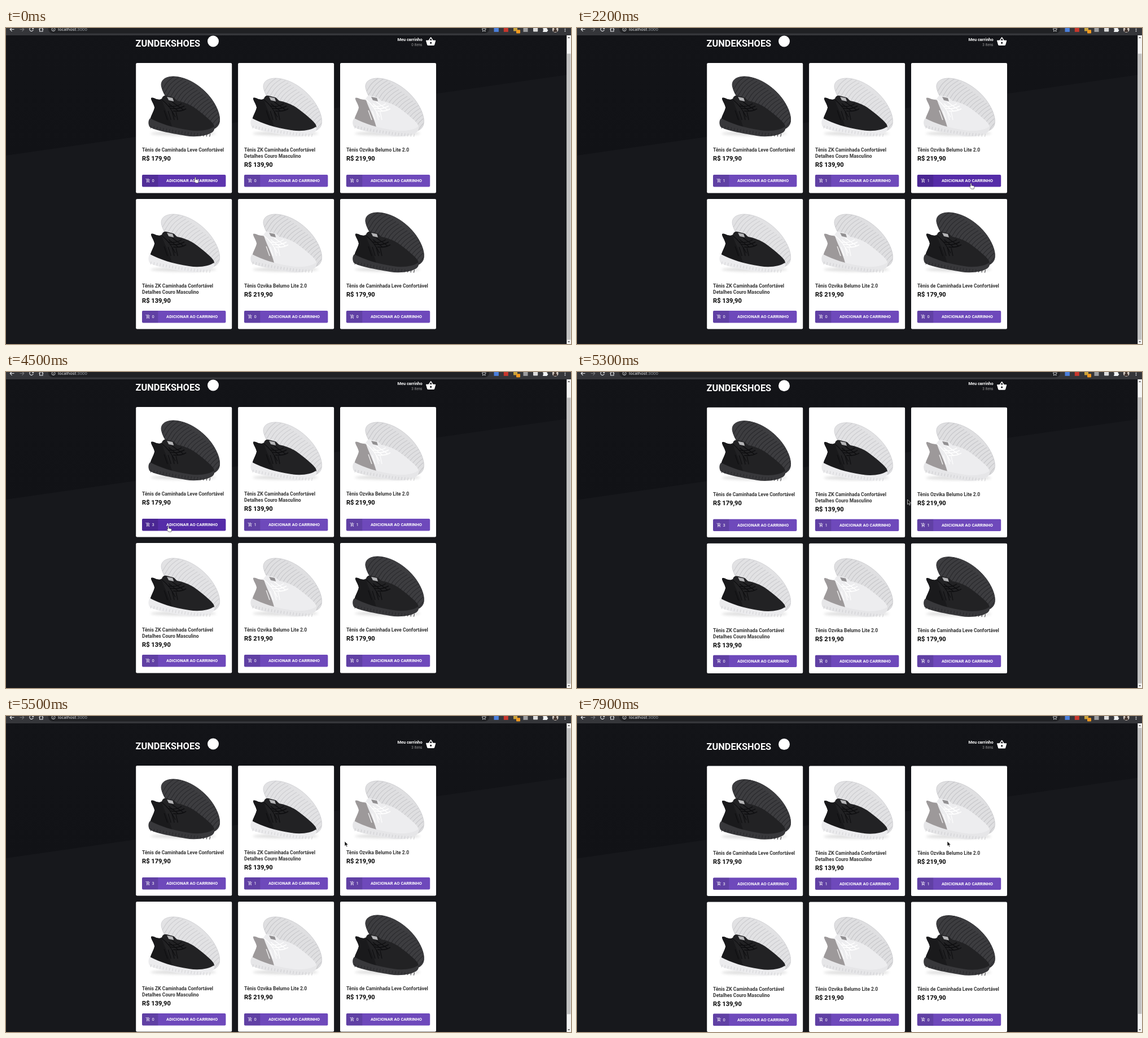
Write an HTML page that moves like this. It is 1001 px wide and 560 px high and loops after 8 s.

```html
<!DOCTYPE html>
<html lang="pt-BR">
<head>
<meta charset="utf-8">
<title>Loja</title>
<style>
  html, body { margin: 0; width: 100%; height: 100%; overflow: hidden; background: #17181c; }
  svg { display: block; }
  #stage { width: 100vw; height: 100vh; }
  text { font-family: Roboto, "Liberation Sans", sans-serif; fill: #fff; }
  .b { font-weight: 700; }
  .name { font-size: 8.52px; fill: #333; }
  .price { font-size: 11.1px; fill: #000; }
  .label { font-size: 7.5px; text-anchor: middle; }
  .qty { font-size: 7.5px; }
  .logo { font-size: 16.35px; }
  .cart { font-size: 7.4px; text-anchor: end; }
  .items { font-size: 6.4px; fill: #999; text-anchor: end; }
  .url { font: 7.65px "Noto Sans", "Open Sans", sans-serif; fill: #e8eaed; }
</style>
</head>
<body>
<svg id="stage" viewBox="0 0 1001 560" preserveAspectRatio="none">
  <defs>
    <linearGradient id="top" x1="0" y1="0" x2="0" y2="1">
      <stop offset="0" stop-color="#131418"/><stop offset="1" stop-color="#111216"/>
    </linearGradient>
    <filter id="soft" x="-20%" y="-100%" width="140%" height="300%"><feGaussianBlur stdDeviation="2"/></filter>
    <path id="sole" d="M45 40C44 29 54 24 67 24C92 25 118 42 134 64C146 81 151 98 147 108C143 117 134 119 126 117L64 74C55 64 47 52 45 40Z"/>
    <path id="upper" d="M27 64C26 61 29 61 32 62C37 65 42 66 46 63C47 59 50 57 54 58L66 61C69 62 70 65 73 67C84 69 94 73 102 78C116 88 131 100 137 108C140 113 139 117 136 120C118 128 82 124 56 117C42 113 29 107 25 101C27 92 32 85 33 79C32 73 28 68 27 64Z"/>
    <path id="mid" d="M25 98C22 101 21 107 24 113C34 120 60 124 88 129C106 132 126 129 135 123C139 120 140 116 138 113C130 119 112 122 94 119C66 115 42 107 25 98Z"/>
    <clipPath id="soleClip"><use href="#sole"/></clipPath>
    <clipPath id="upperClip"><use href="#upper"/></clipPath>
    <path id="add" d="M11 9h2V6h3V4h-3V1h-2v3H8v2h3v3zm-4 9c-1.1 0-2 .9-2 2s.9 2 2 2 2-.9 2-2-.9-2-2-2zm10 0c-1.1 0-2 .9-2 2s.9 2 2 2 2-.9 2-2-.9-2-2-2zm-9.8-3.3l.9-1.7h7.45c.75 0 1.4-.4 1.75-1L21.2 5 19.4 4l-3.85 7H8.5L4.3 2H1v2h2l3.6 7.6-1.35 2.4C4.5 15.4 5.5 17 7 17h12v-2H7.4z"/>
    <path id="basket" fill-rule="evenodd" d="M17.2 9l-4.4-6.6c-.4-.5-1.2-.5-1.6 0L6.8 9H2c-.6 0-1.1.6-1 1.3l2.6 9.2c.2.9 1 1.5 1.9 1.5h13c.9 0 1.7-.6 1.9-1.5L23 10c0-.6-.4-1-1-1h-4.8zM9 9l3-4.4L15 9H9zm3 8a2 2 0 1 1 0-4 2 2 0 0 1 0 4z"/>
  </defs>

  <rect width="1001" height="560" fill="#17181c"/>
  <g id="page">
    <path d="M0-40H1001V82L0 226Z" fill="url(#top)"/>
    <text class="b logo" x="229.6" y="33">ZUNDEKSHOES</text>
    <circle cx="367" cy="23.5" r="10" fill="#fff"/>
    <g id="cart">
      <text class="b cart" x="737.6" y="22.6">Meu carrinho</text>
      <text id="items" class="items" x="737.4" y="31.6"></text>
      <use href="#basket" transform="translate(743.3 14.6) scale(.782)" fill="#fff"/>
    </g>
    <g id="list"></g>
  </g>

  <g id="scrollbar">
    <rect x="993.3" y="13" width="8" height="547" fill="#f4f4f4"/>
    <rect id="thumb" x="994" width="6.4" height="507" fill="#c1c1c1"/>
    <path d="M995.2 18l2-2.6 2 2.6z" fill="#555"/>
    <path d="M995.2 555l2 2.6 2-2.6z" fill="#555"/>
  </g>

  <g id="toolbar" fill="none" stroke="#e8eaed" stroke-width="1.1">
    <rect width="1001" height="13" fill="#35363a" stroke="none"/>
    <rect x="75" y="-8" width="781" height="17.6" rx="8" fill="#202124" stroke="none"/>
    <path d="M14.5 2.5H7.5M10.5-.8L7.2 2.5l3.3 3.3"/>
    <path d="M24.5 2.5h7M28.5-.8l3.3 3.3-3.3 3.3" stroke="#77797d"/>
    <path d="M47.8.5A3.3 3.3 0 1 0 48.3 3M48.6-1.5V1.2H46"/>
    <path d="M58.5 2.5L62.3-1l3.8 3.5M59.6 2v4h5.4v-4"/>
    <circle cx="84" cy="2.5" r="3.1" stroke-width=".8"/>
    <path d="M84 2v2.4M84 .6v.8" stroke-width=".8"/>
    <text class="url" x="92" y="5.2" stroke="none">localhost<tspan fill="#9aa0a6">:3000</tspan></text>
    <path d="M846.8-1.2l1.1 2.5 2.7.3-2 1.8.6 2.7-2.4-1.4-2.4 1.4.6-2.7-2-1.8 2.7-.3z" stroke-width=".8"/>
    <g stroke="none">
      <rect x="864.5" y="-1.5" width="8.4" height="8.4" fill="#4a7fdc"/>
      <rect x="881.8" y="-1.5" width="8" height="8.4" fill="#c9372c"/>
      <rect x="899" y="-1.5" width="7" height="7" fill="#c9a23c"/>
      <rect x="904" y="3.2" width="7" height="6.4" rx="1" fill="#f29a1f"/>
      <rect x="916.5" y="-1.5" width="8" height="8.4" fill="#9b9c9e"/>
      <rect x="934" y="-1.5" width="8.2" height="8" rx="1" fill="#dcdcdc"/>
      <path d="M951.3.2h2.3a1.5 1.5 0 0 1 3 0h2.2v2.3a1.5 1.5 0 0 1 0 3V7h-7.5V4.8a1.4 1.4 0 0 0 0-2.6z" fill="#f1f3f4"/>
      <circle cx="973.2" cy="2.5" r="5.4" fill="#cfc6be"/>
      <path d="M970 7c0-4 1-4 2-4.4C970 1 971-3 973.2-3s3.2 4 1.2 5.6c1 .4 2 .4 2 4.4z" fill="#41342f"/>
      <g fill="#e8eaed"><circle cx="990.5" cy="-.5" r=".9"/><circle cx="990.5" cy="2.5" r=".9"/><circle cx="990.5" cy="5.5" r=".9"/></g>
    </g>
  </g>

  <g id="pointer">
    <path id="hand" d="M-.9.9C-.9-.3 1-.3 1 .9V4l3.6.7C5.6 5 6 5.6 5.9 6.5L5.2 10.2H.6L-2.4 6.6C-3 5.7-2 5-1.2 5.6L-.9 5.9Z" fill="#fff" stroke="#222" stroke-width=".6"/>
    <path id="arrow" d="M0 0V8.6L2 6.8 3.4 10 4.9 9.3 3.5 6.3H6.2Z" fill="#111" stroke="#fff" stroke-width=".6"/>
  </g>
</svg>

<script>
const $ = id => document.getElementById(id);
const clamp = v => Math.max(0, Math.min(1, v));
const LOOP = 8000, STEP = 100;

const looks = {
  black: { sole: '#3d3d40', ridge: '#2c2c2f', edge: '#303033', upper: '#222224', mid: '#38383b', tread: '#27272a',
           heel: '#1a1a1c', lace: '#0e0e10', tag: '#b5b5b7', drop: 0 },
  mixed: { sole: '#e2e2e4', ridge: '#cfcfd2', edge: '#d3d3d6', upper: '#222224', mid: '#ececee', tread: '#d2d2d5',
           heel: '#19191b', lace: '#0e0e10', tag: '#b5b5b7', drop: 3 },
  white: { sole: '#dfdfe1', ridge: '#cacacd', edge: '#cfcfd2', upper: '#ededef', mid: '#e6e6e8', tread: '#cdcdd0',
           heel: '#9d999a', lace: '#fff', tag: '#929092', drop: 3 }
};
const walk = { name: ['Tênis de Caminhada Leve Confortável'], price: '179,90', look: 'black' };
const leather = { name: ['Tênis ZK Caminhada Confortável', 'Detalhes Couro Masculino'], price: '139,90', look: 'mixed' };
const lite = { name: ['Tênis Ozvika Belumo Lite 2.0'], price: '219,90', look: 'white' };
const products = [walk, leather, lite, leather, lite, walk];

function shoe(c) {
  let ridges = '', tread = '';
  for (let i = 0; i < 24; i++) ridges += `M${28 + i * 5} ${62 + i * 4}q16-8 22-20t24-22`;
  for (let i = 0; i < 20; i++) tread += `M${27 + i * 5.5} ${111 + 15 * Math.sin(i / 14)}l-1 5`;
  return `
    <ellipse cx="84" cy="125" rx="58" ry="4" fill="#bbb" opacity=".45" filter="url(#soft)"/>
    <g transform="translate(0 ${c.drop})">
      <use href="#sole" fill="${c.sole}" stroke="${c.edge}" stroke-width="1"/>
      <path d="${ridges}" clip-path="url(#soleClip)" fill="none" stroke="${c.ridge}" stroke-width="1.4"/>
    </g>
    <use href="#upper" fill="${c.upper}"/>
    <g clip-path="url(#upperClip)">
      <path d="M24 60L46 66C52 84 62 100 66 122L20 110Z" fill="${c.heel}"/>
      <path d="M46 65C55 72 62 80 70 96" fill="none" stroke="${c.lace}" stroke-width="1.2"/>
    </g>
    <path d="M50 84l6 17M57 85l5 16M64 86l4 15M71 87l3 14" stroke="${c.lace}" stroke-width="1.5" opacity=".8"/>
    <path d="M57 76q14 3 24-4M61 80q14 3 25-4M66 85q13 2 23-4M58 72l18 14M64 69l20 14" fill="none" stroke="${c.lace}" stroke-width="1.5"/>
    <path d="M55 60l10 2 2 6-9-2z" fill="${c.tag}"/>
    <use href="#mid" fill="${c.mid}"/>
    <path d="${tread}" stroke="${c.tread}" stroke-width="1"/>`;
}

function card(p, i) {
  const x = 230.2 + (i % 3) * 180.9, y = 62 + Math.floor(i / 3) * 241;
  const names = p.name.map((n, k) => `<text class="b name" x="10.9" y="${157.2 + k * 10.9}">${n}</text>`).join('');
  return `<g transform="translate(${x} ${y})">
    <rect width="170" height="230.4" rx="2" fill="#fff"/>
    ${shoe(looks[p.look])}${names}
    <text class="b price" x="10.9" y="${162.2 + p.name.length * 10.9}">R$ ${p.price}</text>
    <rect class="btn" x="10.8" y="198" width="148.4" height="21.4" rx="2"/>
    <path d="M39.2 198H12.8a2 2 0 0 0-2 2v17.4a2 2 0 0 0 2 2H39.2z" opacity=".12"/>
    <use href="#add" transform="translate(17.2 204.3) scale(.348)" fill="#fff"/>
    <text class="qty" x="28.4" y="211.3"></text>
    <text class="b label" x="99.4" y="211.1">ADICIONAR AO CARRINHO</text>
  </g>`;
}
$('list').innerHTML = products.map(card).join('');
const buttons = document.querySelectorAll('.btn'), counts = document.querySelectorAll('.qty');

// [time, x, y] of the pointer tip
const path = [
  [0, 335.5, 264.5], [600, 337, 266], [1100, 337, 266], [1200, 396, 271], [1300, 518, 270],
  [1700, 518, 270], [1800, 560, 273], [1900, 655, 275], [2000, 698, 275], [2600, 698, 275],
  [2700, 590, 277], [2800, 410, 277], [2900, 344, 277], [3100, 340, 276], [3200, 337, 272],
  [3500, 337, 272], [3700, 316, 272], [3900, 314, 273], [4300, 275, 276], [4700, 300, 270],
  [4800, 325, 260], [5000, 440, 242], [5200, 560, 230], [5300, 585.5, 226], [5500, 600, 222],
  [5700, 604, 219], [6000, 650, 168], [6300, 716, 78], [6500, 723, 65.5], [6800, 731, 64],
  [7200, 733, 64], [7400, 655, 145], [7600, 530, 258], [7750, 575, 262], [7900, 656, 222]
];
const scroll = [[5200, 0], [5300, .7], [5400, 14], [5500, 26], [5600, 26], [5700, 26.6]];
// [button, from, to]
const hovers = [[0, -140, 1300], [1, 1200, 1900], [2, 1800, 2800], [0, 2700, 4900]];
// [time, button]
const clicks = [[800, 0], [1500, 1], [2200, 2], [3300, 0], [4000, 0]];

function at(keys, t) {
  const n = keys.findIndex(k => k[0] > t);
  if (n === 0) return keys[0].slice(1);
  if (n < 0) return keys[keys.length - 1].slice(1);
  const a = keys[n - 1], b = keys[n], f = (t - a[0]) / (b[0] - a[0]);
  return a.slice(1).map((v, i) => v + (b[i + 1] - v) * f);
}
const mix = (a, b, f) => `rgb(${a.map((v, i) => Math.round(v + (b[i] - v) * f))})`;

function render(t) {
  const [dy] = at(scroll, t), [x, y] = at(path, t);
  $('page').setAttribute('transform', `translate(0 ${dy})`);
  $('thumb').setAttribute('y', 45.5 - dy * .927);
  $('pointer').setAttribute('transform', `translate(${x} ${y})`);
  $('hand').style.display = t < 4900 ? '' : 'none';
  $('arrow').style.display = t < 4900 ? 'none' : '';
  $('cart').setAttribute('opacity', t < 6400 || t >= 6700 ? 1 : .92);

  const done = clicks.filter(c => c[0] <= t);
  const total = new Set(done.map(c => c[1])).size;
  $('items').textContent = total + (total === 1 ? ' item' : ' itens');
  buttons.forEach((b, i) => {
    const level = hovers.filter(h => h[0] === i)
      .reduce((m, h) => Math.max(m, Math.min(clamp((t - h[1]) / 200), clamp((h[2] - t) / 100))), 0);
    b.setAttribute('fill', mix([110, 73, 187], [85, 44, 168], level));
    counts[i].textContent = done.filter(c => c[1] === i).length;
  });
}

let start;
function tick(now) {
  start ??= now;
  render(Math.floor((now - start) % LOOP / STEP) * STEP);
  requestAnimationFrame(tick);
}
render(0);
requestAnimationFrame(tick);
</script>
</body>
</html>
```
